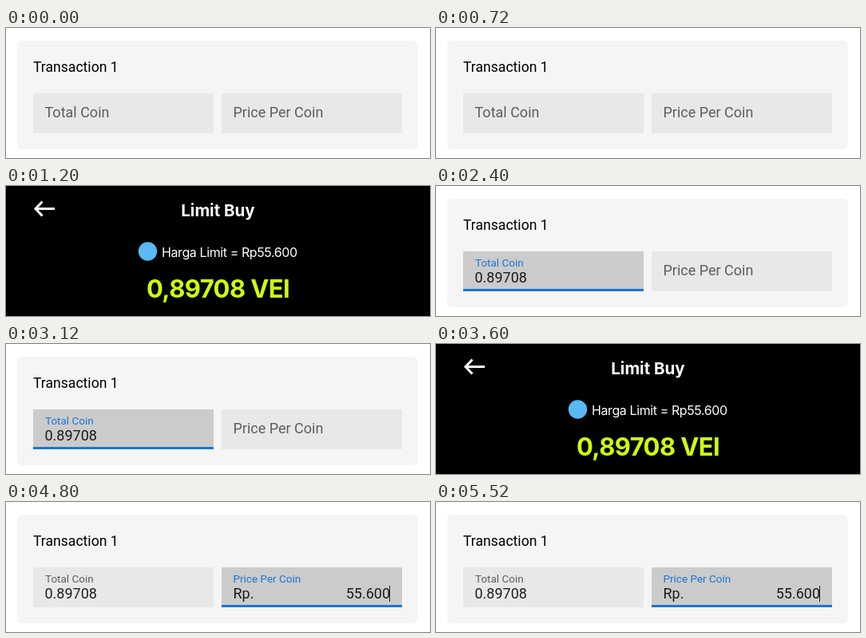
Write an HTML page that moves like this. It is 531 px wide and 163 px high and loops after 6 s.

```html
<!DOCTYPE html>
<html lang="en">
<head>
<meta charset="utf-8">
<title>Coin purchase form</title>
<style>
  html, body { margin: 0; width: 100%; height: 100%; overflow: hidden; background: #fff; }
  svg { display: block; width: 531px; height: 163px; }
  .form { font: 18px Roboto, sans-serif; }
  .title { font-size: 17.6px; }
  .order { font-family: Inter, sans-serif; text-anchor: middle; fill: #fff; }
  .box { fill: #e8e8e8; }
  .hint, .label { fill: rgba(0, 0, 0, .6); }
  .label { font-size: 13.5px; }
  .value { fill: rgba(0, 0, 0, .87); }
  .line { fill: #1976d2; }
  .focus .box { fill: #cbcbcb; }
  .focus .label { fill: #1976d2; }
  .field:not(.focus) .line, .filled .hint,
  .field:not(.filled) .label, .field:not(.filled) .value { display: none; }
  [hidden] { display: none; }
</style>
</head>
<body>
<svg viewBox="0 0 531 163">
  <g class="form" id="form">
    <rect x="14" y="16" width="502" height="136" rx="6" fill="#f5f5f5"/>
    <text class="title" x="34" y="55">Transaction 1</text>
    <g class="field" id="total" transform="translate(34 82)">
      <rect class="box" width="226" height="50"/>
      <rect class="line" y="47" width="226" height="3"/>
      <text class="hint" x="14.5" y="30">Total Coin</text>
      <text class="label" x="15" y="18.5">Total Coin</text>
      <text class="value" x="14.5" y="39">0.89708</text>
    </g>
    <g class="field" id="price" transform="translate(270 82)">
      <rect class="box" width="226" height="50"/>
      <rect class="line" y="47" width="226" height="3"/>
      <text class="hint" x="14.5" y="30">Price Per Coin</text>
      <text class="label" x="14.5" y="18.5">Price Per Coin</text>
      <g class="value">
        <text x="14.5" y="39">Rp.</text>
        <text x="211" y="39" text-anchor="end">55.600</text>
        <rect x="210" y="23" width="1" height="20"/>
      </g>
    </g>
  </g>
  <g class="order" id="order" hidden>
    <rect width="531" height="163" fill="#000"/>
    <path d="M61 28.5H37M45.5 19.5L37 28.5L45.5 37.5" fill="none" stroke="#fff" stroke-width="3"/>
    <text x="265.5" y="37.5" font-size="20.5" font-weight="700">Limit Buy</text>
    <circle cx="177.5" cy="82" r="11.7" fill="#5ab8f2"/>
    <text x="195" y="88.5" font-size="16" letter-spacing="-.4" text-anchor="start">Harga Limit = Rp55.600</text>
    <text x="265.5" y="140" font-size="31" font-weight="700" letter-spacing="-.6" fill="#cfff0a">0,89708 VEI</text>
  </g>
</svg>
<script>
  const STEP = 1200;
  const steps = [
    { total: "", price: "" },
    { order: true },
    { total: "filled focus", price: "" },
    { order: true },
    { total: "filled", price: "filled focus" }
  ];
  const get = id => document.getElementById(id);
  const start = performance.now();
  let shown = -1;

  function show(step) {
    get("order").toggleAttribute("hidden", !step.order);
    get("form").toggleAttribute("hidden", !!step.order);
    for (const id of ["total", "price"]) {
      get(id).setAttribute("class", "field " + (step[id] || ""));
    }
  }

  function tick() {
    const elapsed = Math.max(0, performance.now() - start);
    const index = Math.floor(elapsed / STEP) % steps.length;
    if (index !== shown) show(steps[shown = index]);
    requestAnimationFrame(tick);
  }
  tick();
</script>
</body>
</html>
```
